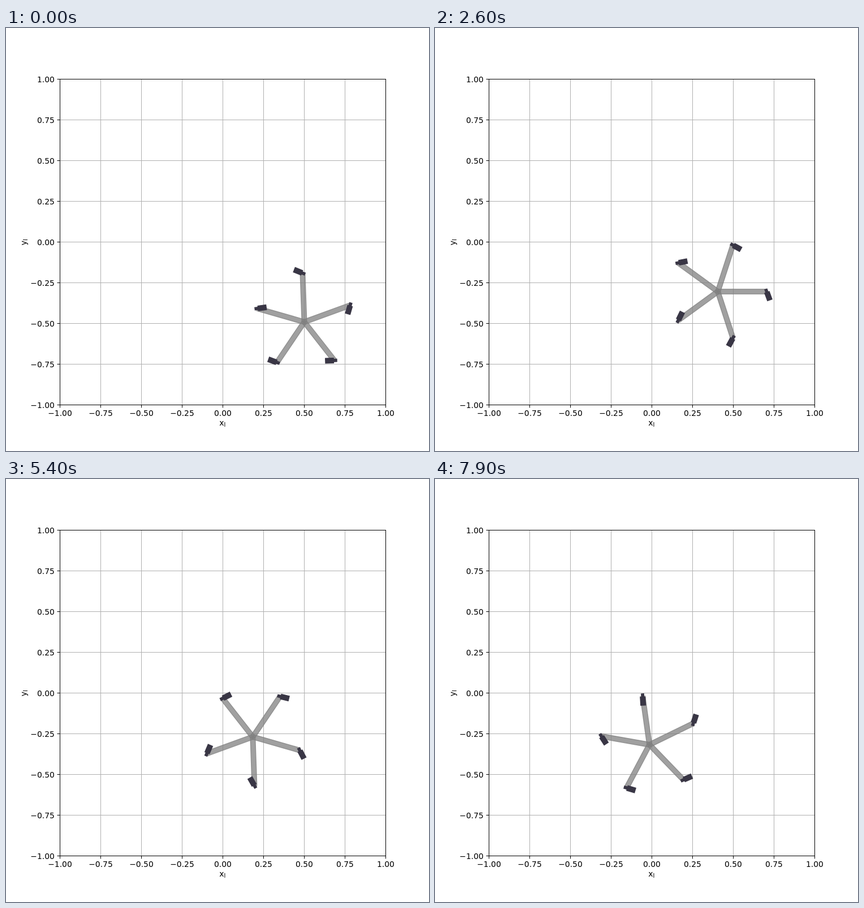
An HTML page that plays this animation: 748x748 px, repeating every 8000 ms.

```html
<!DOCTYPE html>
<html lang="en">
<head>
<meta charset="utf-8">
<title>Five-legged caster base</title>
<style>
  html, body { margin: 0; width: 100%; height: 100%; overflow: hidden; background: #fff; }
  svg { display: block; width: 748px; height: 748px; }
  text { font: 13.89px "DejaVu Sans", sans-serif; }
  .math { font-style: italic; }
  .math .sub { font-size: 9.72px; }
  .grid { stroke: #b0b0b0; }
  .axis { stroke: #000; fill: none; }
  .leg { fill: #808080; stroke: #808080; fill-opacity: .75; stroke-opacity: .75; stroke-width: 1.39; }
  .caster { fill: #393645; stroke: #393645; stroke-width: 1.39; }
</style>
</head>
<body>
<svg viewBox="0 0 748 748">
  <g id="plot"></g>
  <g class="math">
    <text x="377.3" y="703">x<tspan class="sub" dy="2.2">I</tspan></text>
    <text transform="translate(35.5 384.2) rotate(-90)">y<tspan class="sub" dy="2.2">I</tspan></text>
  </g>
  <g id="base"></g>
</svg>
<script>
const RAD = Math.PI / 180;
const LEFT = 95.5, TOP = 90.5, SIZE = 576, CELL = 72;
const LEG = 86.4, TRAIL = 8.64, SPEED = 24, TURN = 20;
const STEP = 0.1, COUNT = 80, TURN_BACK = 59;

function add(parent, tag, attrs, text) {
  const el = document.createElementNS("http://www.w3.org/2000/svg", tag);
  for (const key in attrs) el.setAttribute(key, attrs[key]);
  if (text) el.textContent = text;
  parent.append(el);
  return el;
}

function drawPlot() {
  const plot = document.getElementById("plot");
  const right = LEFT + SIZE, bottom = TOP + SIZE;
  const label = v => (v < 0 ? "\u2212" : "") + Math.abs(v).toFixed(2);
  for (let i = 0; i <= 8; i++) {
    const x = LEFT + i * CELL, y = TOP + i * CELL;
    add(plot, "path", { class: "grid", d: `M${x} ${TOP}V${bottom}M${LEFT} ${y}H${right}` });
    add(plot, "path", { class: "axis", d: `M${x} ${bottom}v5M${LEFT} ${y}h-5` });
    add(plot, "text", { x, y: 686, "text-anchor": "middle" }, label(i / 4 - 1));
    add(plot, "text", { x: 85.8, y: y + 5, "text-anchor": "end" }, label(1 - i / 4));
  }
  add(plot, "rect", { class: "axis", x: LEFT, y: TOP, width: SIZE, height: SIZE });
}

// Each wheel trails its pivot without slipping sideways.
function simulate() {
  let x = 527.5, y = 519.8, heading = 92;
  let wheels = [158, 8, 160, 182, 254];
  const poses = [];
  for (let n = 0; n < COUNT; n++) {
    poses.push({ x, y, heading, wheels });
    const turn = n < TURN_BACK ? TURN : -TURN;
    const vx = SPEED * Math.cos(heading * RAD);
    const vy = SPEED * Math.sin(heading * RAD);
    const swing = turn * RAD * LEG;
    wheels = wheels.map((wheel, k) => {
      const leg = (heading + 72 * k) * RAD, a = wheel * RAD;
      const px = vx - swing * Math.sin(leg);
      const py = vy + swing * Math.cos(leg);
      return wheel + STEP * (px * Math.sin(a) - py * Math.cos(a)) / TRAIL / RAD;
    });
    x += vx * STEP;
    y -= vy * STEP;
    heading += turn * STEP;
  }
  return poses;
}

const base = document.getElementById("base");
const turned = k => ({ transform: `rotate(${-72 * k})` });
const ids = [0, 1, 2, 3, 4];

drawPlot();
for (const k of ids) {
  add(add(base, "g", turned(k)), "rect", { class: "leg", x: 0, y: -4.32, width: LEG, height: 8.64 });
}
const casters = ids.map(k => {
  const caster = add(add(base, "g", turned(k)), "g", { class: "caster" });
  add(caster, "rect", { x: -4.32, y: -2.16, width: 8.64, height: 4.32 });
  add(caster, "rect", { x: 1.44, y: -4.32, width: 14.4, height: 8.64 });
  return caster;
});

const poses = simulate();
const start = performance.now();

function render() {
  const time = Math.max(0, performance.now() - start);
  const { x, y, heading, wheels } = poses[Math.floor(time / 100) % COUNT];
  base.setAttribute("transform", `translate(${x} ${y}) rotate(${-heading})`);
  casters.forEach((caster, k) => {
    const angle = heading + 72 * k - wheels[k];
    caster.setAttribute("transform", `translate(${LEG} 0) rotate(${angle})`);
  });
  requestAnimationFrame(render);
}
render();
</script>
</body>
</html>
```
